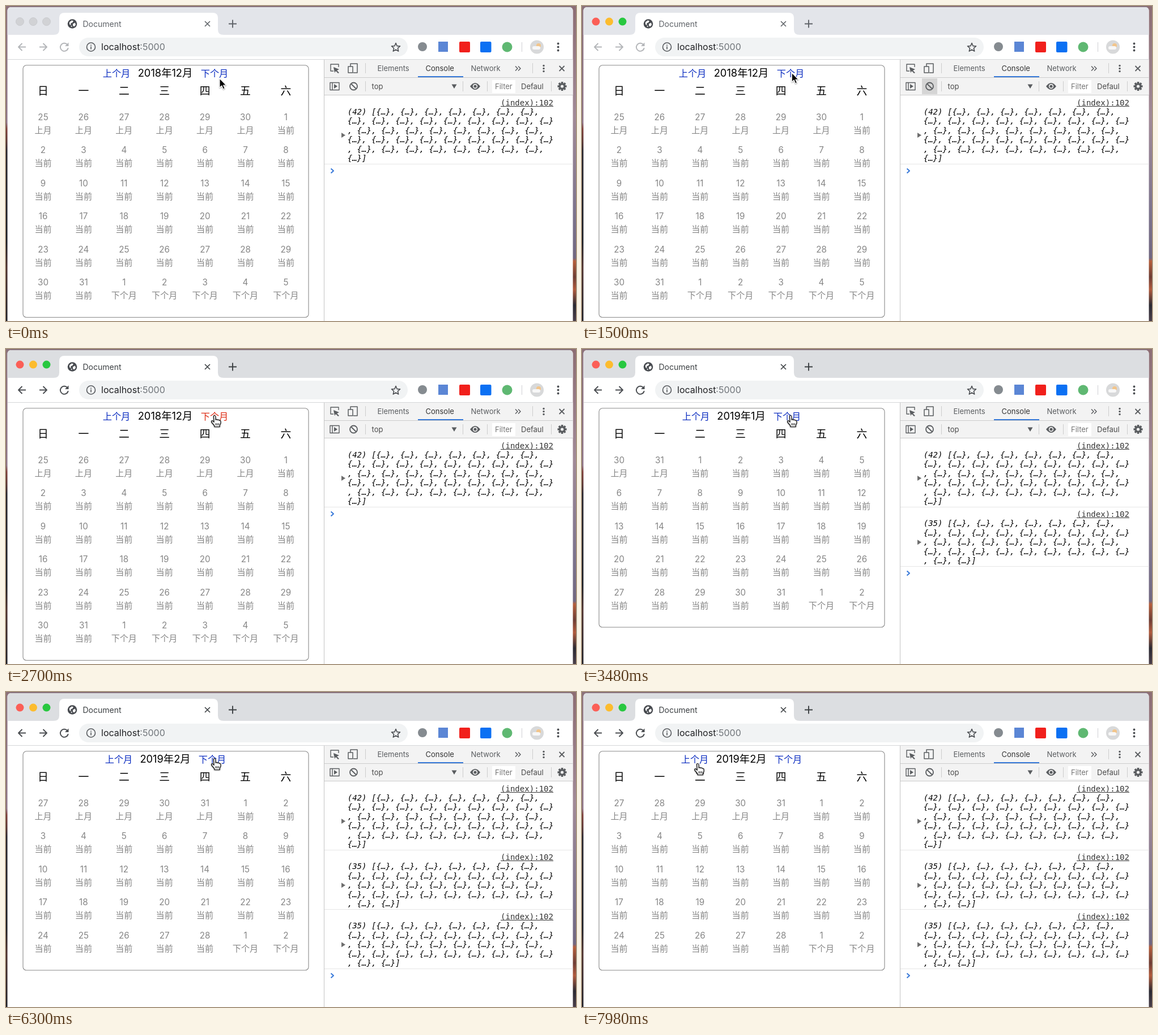
These frames come from a looping animation (1006x557 px, 8000 ms). An HTML page with a canvas:

```html
<!DOCTYPE html>
<html lang="zh-CN">
<head>
<meta charset="utf-8">
<title>Calendar</title>
<style>
  html, body { margin: 0; width: 100%; height: 100%; overflow: hidden; }
  canvas { display: block; }
</style>
</head>
<body>
<canvas id="stage" width="1006" height="557"></canvas>
<script>
const ctx = document.getElementById('stage').getContext('2d');
const LOOP = 8000, STEP = 60;
const SANS = 'Inter, "Noto Sans CJK SC", "Noto Sans CJK JP", "Noto Sans CJK", sans-serif';
const MONO = '"DejaVu Sans Mono", monospace';
const WEEKDAYS = '日一二三四五六';
const LIGHTS_ON = 840, WINDOW_ACTIVE = 1560, HAND_FROM = 1980;
const MONTHS = [
  { from: 0, year: 2018, month: 12, linkOffset: 86.5 },
  { from: 2760, year: 2019, month: 1, linkOffset: 80.5 },
  { from: 5460, year: 2019, month: 2, linkOffset: 82.5 },
];
const PRESSES = [[2580, 2760], [5280, 5460]];
// Cursor hotspot: time, x, y
const CURSOR = [
  [0, 377, 128], [240, 373, 127], [400, 373, 127], [780, 613, 141],
  [900, 613, 141], [1200, 370.3, 118], [7400, 370.3, 118], [7980, 206.5, 127],
];

for (const m of MONTHS) {
  m.first = new Date(m.year, m.month - 1, 1).getDay();
  m.days = new Date(m.year, m.month, 0).getDate();
  m.prevDays = new Date(m.year, m.month - 1, 0).getDate();
  m.cells = Math.ceil((m.first + m.days) / 7) * 7;
  m.log = logLines(m.cells);
}

// The console breaks lines alternately before and after a comma.
function logLines(count) {
  let rest = `(${count}) [${Array(count).fill('{…}').join(', ')}]`;
  const lines = [];
  while (rest) {
    const length = lines.length === 0 ? 41 : lines.length % 2 ? 43 : 42;
    lines.push(rest.slice(0, length));
    rest = rest.slice(length);
  }
  return lines;
}

function rect(x, y, w, h, color) {
  ctx.fillStyle = color;
  ctx.fillRect(x, y, w, h);
}

function round(x, y, w, h, radius, color) {
  ctx.fillStyle = color;
  ctx.beginPath();
  ctx.roundRect(x, y, w, h, radius);
  ctx.fill();
}

function circle(x, y, r, color) {
  ctx.fillStyle = color;
  ctx.beginPath();
  ctx.arc(x, y, r, 0, 2 * Math.PI);
  ctx.fill();
}

function shape(d, x, y, fill, stroke, width = 1) {
  const path = new Path2D(d);
  ctx.save();
  ctx.translate(x, y);
  ctx.lineWidth = width;
  ctx.lineJoin = 'round';
  if (fill) { ctx.fillStyle = fill; ctx.fill(path); }
  if (stroke) { ctx.strokeStyle = stroke; ctx.stroke(path); }
  ctx.restore();
}

const icon = (d, x, y, color, width = 1.7) => shape(d, x, y, null, color, width);

// y is the vertical middle of the capitals
function text(value, x, y, size, color, align = 'left', family = SANS, style = '') {
  ctx.font = `${style} ${size}px ${family}`;
  ctx.fillStyle = color;
  ctx.textAlign = align;
  ctx.fillText(value, x, y + size * 0.365);
}

function gradient(x, y, w, h, stops) {
  const g = ctx.createLinearGradient(0, y, 0, y + h);
  stops.forEach(([at, color]) => g.addColorStop(at, color));
  rect(x, y, w, h, g);
}

function desktop() {
  rect(0, 0, 1006, 557, '#87707a');
  gradient(0, 0, 8, 557, [[0, '#8c717a'], [0.37, '#8d7285'], [0.39, '#7d3a35'],
    [0.43, '#58302f'], [0.46, '#25222b'], [0.75, '#171a22'], [0.83, '#4b2d2b'], [1, '#1c1d25']]);
  gradient(998, 0, 8, 557, [[0, '#8d6d73'], [0.35, '#a28a97'], [0.65, '#7d748d'],
    [0.8, '#716780'], [0.81, '#b55e3b'], [0.86, '#6e3d34'], [0.9, '#b05a3c'], [0.95, '#2a2932'], [1, '#4a3e49']]);
}

function browser(active, lights) {
  round(2.5, 2, 998, 570, 6, '#ffffff');
  round(2.5, 2, 998, 49, [6, 6, 0, 0], active ? '#dcdee1' : '#e3e5ea');

  ['#fb5f57', '#fcbc2e', '#28c840'].forEach((color, i) => {
    circle(24.5 + i * 23.5, 27.6, 7, lights ? color : '#d1d2d5');
    if (!lights) {
      ctx.strokeStyle = '#c5c6c9';
      ctx.lineWidth = 0.8;
      ctx.stroke();
    }
  });

  shape('M84 51Q94 51 94 42V21Q94 12 103 12H365Q374 12 374 21V42Q374 51 384 51Z', 0, 0, '#fff');
  const ink = active ? '#3c4043' : '#5f6368';
  circle(117, 31.5, 8.3, '#484b50');
  shape('M-5-3L-1-6 2-5 0-2-3-1-2 2-5 1Z M1 0L5-2 6 2 3 5 1 3Z M-3 3L0 4-1 6Z', 117, 31.5, '#fff');
  text('Document', 135.5, 31.5, 14, ink);
  icon('M-4.5-4.5L4.5 4.5M4.5-4.5L-4.5 4.5', 355.5, 31.5, ink, 1.6);
  icon('M-7 0H7M0-7V7', 400, 31.5, ink, 1.9);

  const nav = active ? '#4a4d51' : '#b4b6b9';
  icon('M7 0H-6M0.5-6.5L-6 0 0.5 6.5', 28, 72.5, nav, 1.9);
  icon('M-7 0H6M-0.5-6.5L6 0-0.5 6.5', 66, 72.5, nav, 1.9);
  icon('M5-4.5A7 7 0 1 0 6.8 1.5', 103, 72.5, nav, 1.9);
  shape('M7.5-8V-1.5H1Z', 103, 72.5, nav);

  round(129, 56, 580, 33, 16.5, '#f1f3f4');
  icon('M7.5 0A7.5 7.5 0 1 0-7.5 0 7.5 7.5 0 1 0 7.5 0M0-1V4M0-4V-2.3', 150, 72.5, '#55585c', 1.6);
  text('localhost', 168, 72.6, 16, '#202124');
  const hostWidth = ctx.measureText('localhost').width;
  text(':5000', 168 + hostWidth, 72.6, 16, '#70757a');
  icon('M0-7.5L2.1-2.4 7.6-2 3.4 1.6 4.7 7 0 4.1-4.7 7-3.4 1.6-7.6-2-2.1-2.4Z', 688, 73, '#4c4f53', 1.6);

  circle(735, 72, 8, '#858b90');
  rect(763, 63, 17, 18, '#5b86d5');
  round(800, 63, 19, 19, 2, '#f1201c');
  round(837, 63, 19.5, 19, 2, '#0b70f3');
  circle(884.5, 72.5, 9, '#5fb872');
  rect(910, 64, 1, 17, '#cfd1d4');
  circle(937, 72.5, 12, '#d8d9da');
  circle(940, 70, 4, '#f2c58b');
  round(929, 71, 14, 6, 3, '#f7f7f7');
  [-6, 0, 6].forEach(dy => circle(974.5, 72.5 + dy, 1.9, '#4c4f53'));
  rect(3, 94, 997.5, 1, '#d5d6d8');
}

function devtools(clearHovered) {
  const ink = '#5a5d60';
  rect(561, 95, 439.5, 62, '#f3f3f3');
  rect(561, 95, 1, 462, '#c4c4c4');
  rect(562, 126, 438.5, 1, '#cccccc');
  rect(562, 157, 438.5, 1, '#cccccc');

  icon('M-2 5H-7V-7H7V-2', 580, 110, ink, 1.4);
  shape('M-2-2L8 2 4 4 8 8 6 9 2 5 0 8Z', 580, 110, ink);
  icon('M-4-3V-8H8V8H1M-8-3H0V8H-8Z', 612, 110, ink, 1.5);
  rect(634, 101, 1, 18, '#cccccc');
  text('Elements', 655.5, 110, 13, ink);
  text('Console', 740.5, 110, 13, '#333333');
  text('Network', 820.5, 110, 13, ink);
  rect(727, 124, 80, 2, '#3578d8');
  icon('M-4-4L0 0-4 4M1-4L5 0 1 4', 903, 110.5, ink, 1.5);
  rect(929, 101, 1, 18, '#cccccc');
  [-5, 0, 5].forEach(dy => circle(949, 110.5 + dy, 1.7, ink));
  icon('M-4.5-4.5L4.5 4.5M4.5-4.5L-4.5 4.5', 981, 110.5, ink, 1.8);

  if (clearHovered) rect(600, 128, 27, 28, '#d5d5d5');
  icon('M-8-6.5H8V6.5H-8ZM-4-6.5V6.5', 580, 142, ink, 1.4);
  shape('M-1-4L5 0-1 4Z', 580, 142, ink);
  icon('M6.5 0A6.5 6.5 0 1 0-6.5 0 6.5 6.5 0 1 0 6.5 0M-4.5-4.5L4.5 4.5', 613.5, 142, ink, 1.8);
  rect(634, 133, 1, 18, '#cccccc');
  text('top', 645.5, 142, 13, '#4a4a4a');
  shape('M-4.5-3.5H4.5L0 4Z', 791, 142, ink);
  rect(806, 133, 1, 18, '#cccccc');
  shape('M-9 0Q0-12 9 0Q0 12-9 0Z', 828, 142, ink);
  circle(828, 142, 4.2, '#f3f3f3');
  circle(828, 142, 2.6, ink);
  rect(849, 133, 1, 18, '#cccccc');
  rect(858, 131, 41, 23, '#ffffff');
  text('Filter', 863, 142.5, 13, '#757575');
  text('Defaul', 909, 142, 13, '#4a4a4a');
  rect(962, 133, 1, 18, '#cccccc');
  for (let i = 0; i < 8; i++) {
    ctx.save();
    ctx.translate(981.5, 142);
    ctx.rotate(i * Math.PI / 4);
    rect(-1.8, -8, 3.6, 4, ink);
    ctx.restore();
  }
  circle(981.5, 142, 6, ink);
  circle(981.5, 142, 2.6, '#f3f3f3');
}

function consoleLogs(logs) {
  let top = 158;
  for (const lines of logs) {
    text('(index):102', 966, top + 12.5, 14.05, '#333333', 'right', MONO);
    rect(873, Math.round(top + 18.6), 93, 1, '#333333');
    lines.forEach((line, i) =>
      text(line, 602.7, top + 28.8 + i * 16.4, 14.05, '#000000', 'left', MONO, 'italic'));
    shape('M-3-4.5L4 0-3 4.5Z', 595, top + 29.5 + (lines.length - 1) * 8.2, '#6e6e6e');
    top += 23 + lines.length * 16.4;
    rect(562, Math.round(top), 438.5, 1, '#e6e6e6');
  }
  icon('M-2.5-4L2 0-2.5 4', 576, top + 12, '#3879d9', 2);
}

function calendar(m, pressed) {
  const rows = m.cells / 7;
  ctx.strokeStyle = '#8a8a8a';
  ctx.lineWidth = 1.1;
  ctx.beginPath();
  ctx.roundRect(30, 104.8, 504, 94.7 + rows * 58.5, 6);
  ctx.stroke();

  text('上个月', 281.5 - m.linkOffset, 119, 16.2, '#0a2cc0', 'center');
  text(`${m.year}年${m.month}月`, 281, 118.7, 18.3, '#000000', 'center');
  text('下个月', 281.5 + m.linkOffset, 119, 16.2, pressed ? '#dd2a12' : '#0a2cc0', 'center');

  const columnX = i => 65.5 + i * 71.4;
  [...WEEKDAYS].forEach((day, i) => text(day, columnX(i), 150, 18.8, '#000000', 'center'));
  for (let i = 0; i < m.cells; i++) {
    const n = i - m.first + 1;
    const x = columnX(i % 7), y = 196 + Math.floor(i / 7) * 58.5;
    const [day, label] = n < 1 ? [n + m.prevDays, '上月']
      : n > m.days ? [n - m.days, '下个月'] : [n, '当前'];
    text(day, x, y, 15.2, '#858585', 'center');
    text(label, x, y + 23.3, 15.1, '#858585', 'center');
  }
}

function cursorAt(t) {
  const next = CURSOR.findIndex(point => point[0] > t);
  if (next < 0) return CURSOR.at(-1).slice(1);
  const [t0, x0, y0] = CURSOR[next - 1], [t1, x1, y1] = CURSOR[next];
  const k = (t - t0) / (t1 - t0), ease = k * k * (3 - 2 * k);
  return [x0 + (x1 - x0) * ease, y0 + (y1 - y0) * ease];
}

function cursor(t, m) {
  const [x, y] = cursorAt(t);
  const onLink = Math.abs(Math.abs(x - 281.5) - m.linkOffset) < 25;
  ctx.save();
  ctx.shadowColor = 'rgba(0,0,0,.3)';
  ctx.shadowBlur = 2;
  ctx.shadowOffsetY = 1;
  if (t >= HAND_FROM && onLink) {
    shape('M-4 1.5Q-4-.5-2.3-.5T-.3 1.5V7Q1.5 5.6 3 7.3 5 6.2 6 8.2 8.6 7.5 8.7 10.5V13Q8 15 7 16.5V19.5H-2.5V17.5L-7.5 11.5Q-8.5 9-6.3 8.6-5 9-3.2 11.2Z', x, y, '#fff', '#111', 1.2);
    icon('M0 13V17M2.5 13V17M5 13V17', x, y, '#111', 0.9);
  } else {
    shape('M0 0V16.5L3.8 13 6.3 19 9.2 17.8 6.7 12H11.8Z', x, y, '#000', '#fff', 1.2);
  }
  ctx.restore();
}

function draw(now) {
  const t = Math.floor(now % LOOP / STEP) * STEP;
  const shown = MONTHS.filter(m => t >= m.from);
  const current = shown.at(-1);
  const pressed = PRESSES.some(([from, to]) => t >= from && t < to);
  desktop();
  browser(t >= WINDOW_ACTIVE, t >= LIGHTS_ON);
  devtools(t >= 720 && t < WINDOW_ACTIVE);
  consoleLogs(shown.map(m => m.log));
  calendar(current, pressed);
  cursor(t, current);
  requestAnimationFrame(draw);
}

requestAnimationFrame(draw);
</script>
</body>
</html>
```
